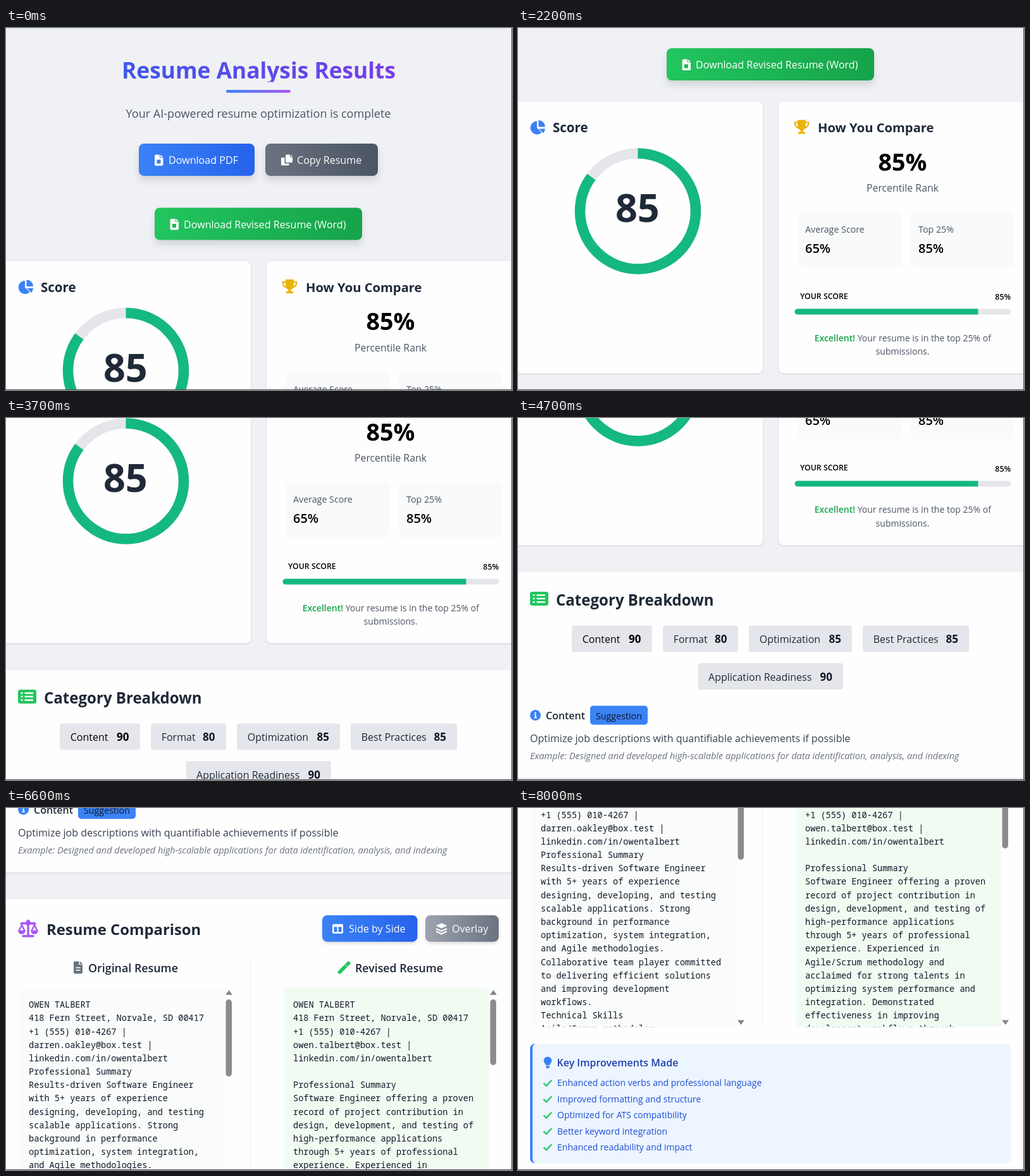
An HTML page that plays this animation: 800x573 px, repeating every 8.1 s.

```html
<!DOCTYPE html>
<html lang="en">
<head>
<meta charset="utf-8">
<title>Resume Analysis Results</title>
<style>
html, body { margin: 0; width: 100%; height: 100%; overflow: hidden; background: #f0f1f5; }
svg { display: block; width: 800px; height: 573px; }
text { font-family: "Open Sans", "Noto Sans", sans-serif; font-variant-ligatures: none; white-space: pre; }
.mono text { font-family: "Noto Sans Mono", "DejaVu Sans Mono", monospace; }
.card { fill: #fefefe; filter: drop-shadow(0 1px 1.5px rgba(0,0,0,.13)); }
.raised { filter: drop-shadow(0 7px 6px rgba(0,0,0,.12)); }
.low { filter: drop-shadow(0 3px 2.5px rgba(0,0,0,.12)); }
</style>
</head>
<body>
<svg viewBox="0 0 800 573">
  <defs>
    <linearGradient id="title" gradientUnits="userSpaceOnUse" x1="0" x2="800" y1="0" y2="0">
      <stop stop-color="#2563eb"/><stop offset="1" stop-color="#9333ea"/></linearGradient>
    <linearGradient id="rule"><stop stop-color="#3b82f6"/><stop offset="1" stop-color="#a855f7"/></linearGradient>
    <linearGradient id="blue"><stop stop-color="#3b82f6"/><stop offset="1" stop-color="#2563eb"/></linearGradient>
    <linearGradient id="slate"><stop stop-color="#6b7280"/><stop offset="1" stop-color="#4b5563"/></linearGradient>
    <linearGradient id="green"><stop stop-color="#22c55e"/><stop offset="1" stop-color="#16a34a"/></linearGradient>
    <linearGradient id="gray"><stop stop-color="#9ca3af"/><stop offset="1" stop-color="#6b7280"/></linearGradient>
    <clipPath id="titleClip"><path d="M0 30H800V85.5H0z"/></clipPath>
    <clipPath id="paneClip"><path d="M0 1350H800V1755H0z"/></clipPath>
  </defs>
  <g id="page"></g>
  <path d="M799.5 0V573M0 572.5H800" stroke="#4b4f58"/>
</svg>
<script>
const INK = '#1f2937', MUTED = '#4b5563', BLUE = '#3b82f6', GREEN = '#22c55e', TEAL = '#15b881', TRACK = '#e5e6eb';

const rect = (x, y, w, h, r, fill, more = '') =>
  `<rect x="${x}" y="${y}" width="${w}" height="${h}" rx="${r}" fill="${fill}" ${more}/>`;
const path = (d, fill, more = '') => `<path d="${d}" fill="${fill}" ${more}/>`;
const line = (d, color, width, more = '') =>
  path(d, 'none', `stroke="${color}" stroke-width="${width}" ${more}`);
const text = (x, y, size, weight, fill, str, more = '') =>
  `<text x="${x}" y="${y}" font-size="${size}" font-weight="${weight}" fill="${fill}" ${more}>${str}</text>`;
const mid = 'text-anchor="middle"', end = 'text-anchor="end"', round = 'stroke-linecap="round" stroke-linejoin="round"';
const button = (x, y, w, h, name, tx, label, cls) =>
  rect(x, y, w, h, 8, `url(#${name})`, `class="${cls}"`) + text(tx, y + h / 2 + 6.6, 16.1, 400, '#fff', label);
const file = (x, y, fill) =>
  path(`M${x} ${y + 2}q0-2 2-2h6v5h5.5v10.500q0 2-2 2h-9.500q-2 0-2-2zM${x + 9} ${y}l4.500 4h-4.500z`, fill);

function header() {
  return rect(0, 0, 800, 1, 0, '#cfe0f5')
    + `<g clip-path="url(#titleClip)">${text(399.5, 80, 35.3, 700, 'url(#title)', 'Resume Analysis Results', mid)}</g>`
    + rect(348, 98, 102, 4.5, 2.2, 'url(#rule)')
    + text(399, 141.5, 18.04, 400, MUTED, 'Your AI-powered resume optimization is complete', mid)
    + button(210, 183, 183, 51, 'blue', 257, 'Download PDF', 'raised')
    + file(235, 200.5, '#fff') + rect(238.5, 208.5, 6, 6, 0, BLUE)
    + button(410, 183, 178, 51, 'slate', 460, 'Copy Resume', 'raised')
    + path('M436.500 205h4v9.500h7v1.500q0 1.500-1.500 1.500h-9.500q-1.500 0-1.500-1.500v-9.500q0-1.500 1.500-1.500zM443.500 200.500h5.500v4h4v7q0 1.500-1.500 1.500h-8q-1.500 0-1.500-1.500v-9.500q0-1.500 1.500-1.500zM450 200.500l3 3h-3z', '#fff')
    + button(235, 284.5, 328, 51, 'green', 281, 'Download Revised Resume (Word)', 'raised')
    + file(259.5, 302, '#fff') + rect(263, 310, 6, 6, 0, '#20b858');
}

function scoreCards() {
  const len = 2 * Math.PI * 91.5;
  const ring = (color, share) => `<circle cx="189.5" cy="542.5" r="91.5" fill="none" stroke="${color}" stroke-width="16.5"
    stroke-dasharray="${len * share} ${len}" transform="rotate(-90 189.5 542.5)"/>`;
  const stat = (x, label, value) => rect(x - 12, 543.5, 164, 88, 8, '#f9fafa')
    + text(x, 576.5, 14.25, 400, MUTED, label) + text(x, 608.3, 20, 600, '#000', value);
  return rect(-30, 369, 417, 430, 8, '', 'class="card"') + rect(412, 369, 420, 430, 8, '', 'class="card"')
    + path('M30 400a10.500 10.500 0 1 0 7.500 18l-7.500-7.500zM32.500 398.500a10.500 10.500 0 0 1 10.500 10.500h-10.500zM33 412h10q-.5 4-3 7z', BLUE)
    + text(55, 417.9, 20.5, 700, INK, 'Score')
    + ring(TRACK, 1) + ring(TEAL, .85)
    + text(188.8, 559.5, 61, 700, INK, '85', mid)
    + path('M442 398h13v7q0 7-4.500 9.500v2.500h2.500q1.500 0 1.500 3h-12q0-3 1.500-3h2.500v-2.500q-4.500-2.500-4.500-9.500z', '#eab308')
    + line('M442 402h-4.300q0 8 7 9M455 402h4.300q0 8-7 9', '#eab308', 2.2)
    + text(474, 417.9, 20.2, 700, INK, 'How You Compare')
    + text(608, 478, 37.6, 700, '#000', '85%', mid)
    + text(608, 511.7, 15.85, 400, MUTED, 'Percentile Rank', mid)
    + stat(454, 'Average Score', '65%') + stat(633, 'Top 25%', '85%')
    + text(446, 681, 12.3, 600, '#000', 'YOUR SCORE') + text(779, 682.4, 12.3, 600, '#000', '85%', end)
    + rect(437.5, 697, 341.5, 9, 4.5, TRACK) + path('M727.500 697H442a4.500 4.500 0 0 0 0 9H727.500z', TEAL)
    + text(608.3, 748, 14, 400, MUTED, '<tspan font-weight="600" fill="#16a34a">Excellent!</tspan> Your resume is in the top 25% of', mid)
    + text(608, 769.2, 14, 400, MUTED, 'submissions.', mid);
}

function categories() {
  const chip = (x, y, w, label, score, sx, color = INK) => rect(x, y, w, 42, 4, TRACK)
    + text(x + 16.7, y + 27.8, 16, 400, color, label) + text(sx, y + 27.8, 17, 700, color === INK ? '#111827' : color, score);
  const rows = [878, 883.5, 889];
  return rect(-20, 841.5, 840, 326, 0, '', 'class="card"')
    + rect(19, 872.5, 29, 22, 3.5, GREEN)
    + rows.map(y => line(`M23.500 ${y}h3M29.500 ${y}h13.500`, '#fff', 2.4)).join('')
    + text(60, 894.2, 24.05, 700, INK, 'Category Breakdown')
    + chip(85, 926, 127, 'Content', 90, 175, '#000')
    + chip(229, 926, 119, 'Format', 80, 311)
    + chip(365, 926, 163, 'Optimization', 85, 491.5)
    + chip(545, 926, 168, 'Best Practices', 85, 676.5)
    + chip(284.3, 985.5, 229.5, 'Application Readiness', 90, 477.5)
    + `<circle cx="27.5" cy="1068" r="8.5" fill="${BLUE}"/><circle cx="27.5" cy="1064.500" r="1.300" fill="#fff"/>`
    + line('M25.800 1067.500h2v4M25.300 1072h4.500', '#fff', 1.6)
    + text(44, 1075, 16, 600, INK, 'Content')
    + rect(114, 1053, 91, 30, 5, BLUE) + text(123, 1074.5, 14.25, 400, '#111827', 'Suggestion')
    + text(19, 1111, 16, 400, '#374151', 'Optimize job descriptions with quantifiable achievements if possible')
    + text(19, 1138, 14.52, 400, '#6b7280', 'Example: Designed and developed high-scalable applications for data identification, analysis, and indexing', 'font-style="italic"');
}

const contact = `OWEN TALBERT
418 Fern Street, Norvale, SD 00417
+1 (555) 010-4267 |
`;
const before = contact + `darren.oakley@box.test |
linkedin.com/in/owentalbert
Professional Summary
Results-driven Software Engineer
with 5+ years of experience
designing, developing, and testing
scalable applications. Strong
background in performance
optimization, system integration,
and Agile methodologies.
Collaborative team player committed
to delivering efficient solutions
and improving development
workflows.
Technical Skills
Agile/Scrum methodology`;
const after = contact + `owen.talbert@box.test |
linkedin.com/in/owentalbert

Professional Summary
Software Engineer offering a proven
record of project contribution in
design, development, and testing of
high-performance applications
through 5+ years of professional
experience. Experienced in
Agile/Scrum methodology and
acclaimed for strong talents in
optimizing system performance and
integration. Demonstrated
effectiveness in improving
development workflows through`;

function comparison() {
  const pane = (x, fill, body, thumb) => rect(x, 1350, 325, 405, 6, fill)
    + `<g class="mono" clip-path="url(#paneClip)">`
    + body.split('\n').map((s, i) => text(x + 15, 1382 + i * 21.18, 13.58, 400, '#111827', s)).join('') + '</g>'
    + rect(x + 326.5, 1368.8, 9.5, thumb, 4.7, '#8b8b8b')
    + path(`M${x + 326} 1361.500h11l-5.500-7.500zM${x + 326} 1744.500h11l-5.500 7.500z`, '#858585');
  return rect(-20, 1210, 840, 800, 0, '', 'class="card"')
    + line('M35 1244V1268M24 1248.500H46M27 1268.500H43', '#a855f7', 3.4, round)
    + line('M20.500 1260l4.500-9 4.500 9M40.500 1260l4.500-9 4.500 9', '#a855f7', 2.4)
    + path('M19 1259.500h12q-1 6-6 6t-6-6zM39 1259.500h12q-1 6-6 6t-6-6z', '#a855f7')
    + '<circle cx="35" cy="1247.500" r="4" fill="#a855f7"/>'
    + text(64, 1267, 23.85, 700, INK, 'Resume Comparison')
    + button(500, 1235.5, 150.5, 42, 'blue', 542, 'Side by Side', 'low')
    + path('M518 1249.500h13q2 0 2 2v11q0 2-2 2h-13q-2 0-2-2v-11q0-2 2-2zM518.500 1254v8h5v-8zM525.500 1254v8h5v-8z', '#fff', 'fill-rule="evenodd"')
    + button(663, 1235.5, 116, 42, 'gray', 705, 'Overlay', 'low')
    + path('M688.500 1248l9 4-9 4.200-9-4.200z', '#fff')
    + line('M680 1256.700l8.500 4 8.500-4M680 1261l8.500 4 8.500-4', '#fff', 2.2)
    + line('M386.500 1304V1755', '#f0f1f4', 1)
    + path('M109 1308.500h6.500v5.500h5.500v12q0 2-2 2h-10q-2 0-2-2v-15.500q0-2 2-2zM117 1308.500l4.500 4.500h-4.500z', '#6b7280')
    + line('M110.500 1318.500h7M110.500 1322.500h7', '#fff', 1.5)
    + text(130, 1325.4, 17.85, 600, INK, 'Original Resume')
    + line('M527.500 1325.500L541.500 1311.500', GREEN, 5.6, round)
    + line('M536 1313.500l3.500 3.500', '#fefefe', 1)
    + text(552, 1325.4, 17.75, 600, INK, 'Revised Resume')
    + pane(21, '#fafbfb', before, 122) + pane(439, '#f1fbf2', after, 104);
}

function improvements() {
  const items = ['Enhanced action verbs and professional language', 'Improved formatting and structure',
    'Optimized for ATS compatibility', 'Better keyword integration', 'Enhanced readability and impact'];
  return rect(19, 1781.8, 760, 189.5, 8, '#edf5fe')
    + path('M27 1781.800a8 8 0 0 0-8 8v173.500a8 8 0 0 0 8 8q-4-2-4-8v-173.500q0-6 4-8z', BLUE)
    + path('M47 1802.500a6.200 6.200 0 0 1 4.500 10.500q-1.200 1.500-1.500 3h-6q-.3-1.500-1.500-3a6.200 6.200 0 0 1 4.500-10.500zM44 1817h6q0 4-3 4t-3-4z', BLUE)
    + text(61.5, 1818, 16, 600, '#1e40af', 'Key Improvements Made')
    + items.map((s, i) => {
      const y = 1849.3 + i * 25.4;
      return line(`M41 ${y - 4.5}l3.800 4 7.700-8.500`, GREEN, 2.2, round) + text(62, y, 14, 400, '#1d4ed8', s);
    }).join('');
}

const page = document.getElementById('page');
page.innerHTML = header() + scoreCards() + categories() + comparison() + improvements();

// Scroll offset at given seconds, joined by constant speeds.
const stops = [[0, 0], [.1, 2], [.2, 6], [.4, 25], [.8, 75.5], [2.2, 252.5], [3.7, 442.5],
  [4.46, 538.6], [5.7, 843.5], [6.6, 1065.8], [8, 1408.8], [8.1, 1408.8]];

function scrollAt(t) {
  const i = stops.findIndex(s => s[0] > t);
  const [t0, y0] = stops[i - 1], [t1, y1] = stops[i];
  return y0 + (y1 - y0) * (t - t0) / (t1 - t0);
}

function draw(now) {
  const t = Math.floor(now % 8100 / 100) / 10;
  page.setAttribute('transform', `translate(0 ${-scrollAt(t)})`);
  requestAnimationFrame(draw);
}
draw(performance.now());
</script>
</body>
</html>
```
